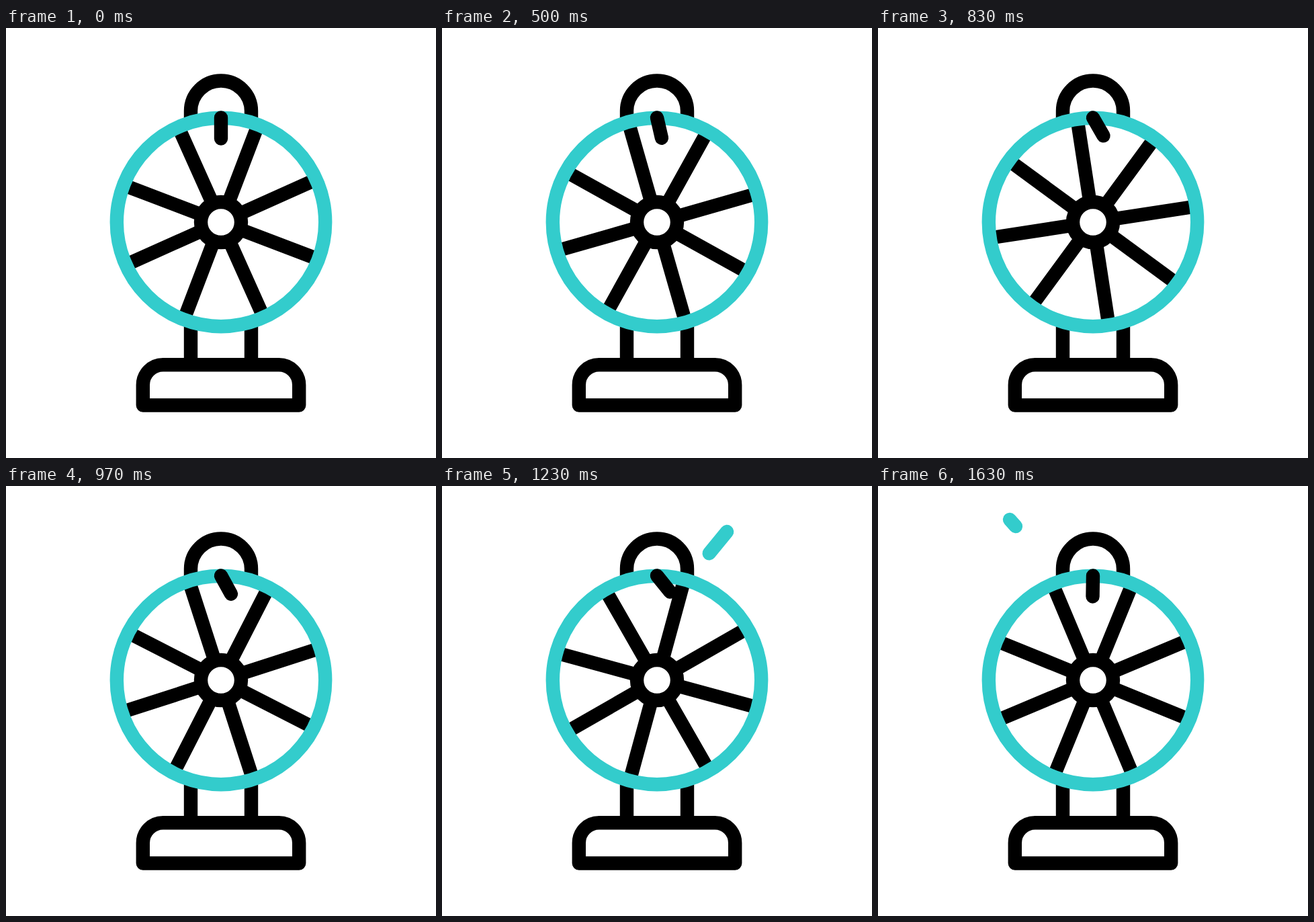
Write an HTML page that moves like this. It is 640 px wide and 640 px high and loops after 1.67 s.

```html
<!DOCTYPE html>
<html lang="en">
<head>
<meta charset="utf-8">
<title>Spinning wheel</title>
<style>
  html, body { margin: 0; width: 100%; height: 100%; overflow: hidden; background: #fff; }
  svg { display: block; width: 100%; height: 100%; }
  .ink, .accent { fill: none; stroke: #000; stroke-width: 20.4; }
  .accent { stroke: #3cc; }
  .round { stroke-linecap: round; stroke-linejoin: round; }
  .white { fill: #fff; }
</style>
</head>
<body>
<svg viewBox="0 0 640 640">
  <path class="ink" d="M275 500V123.5a45 45 0 0 1 90 0V500"/>
  <path class="ink white round" d="M203.8 561.5V531.3a30 30 0 0 1 30-30H406.2a30 30 0 0 1 30 30V561.5Z"/>
  <circle class="white" cx="320" cy="289" r="155"/>
  <g id="spokes" class="ink">
    <path d="M320 139V439M170 289H470"/>
    <path d="M320 139V439M170 289H470" transform="rotate(45 320 289)"/>
  </g>
  <circle class="ink white" cx="320" cy="289" r="30"/>
  <circle class="accent" cx="320" cy="289" r="155.2"/>
  <path id="pointer" class="ink round" d="M320 133.5V164.5"/>
  <g id="sparks" class="accent round"></g>
</svg>
<script>
const LOOP = 1670;
const spokes = document.getElementById('spokes');
const pointer = document.getElementById('pointer');

const clamp = x => Math.min(1, Math.max(0, x));
const smooth = x => (x = clamp(x), x * x * (3 - 2 * x));
const mix = (a, b, k) => a + (b - a) * k;

// Keys are [step, angle, speed]; cubic curves join them, and speed defaults to rest.
function follow(keys, step) {
  const i = keys.findIndex(key => key[0] > step);
  if (i < 0) return keys.at(-1)[1];
  const [t0, a0, v0 = 0] = keys[i - 1], [t1, a1, v1 = 0] = keys[i];
  const span = t1 - t0, u = (step - t0) / span;
  return mix(a0, a1, smooth(u)) + span * u * (1 - u) * (v0 * (1 - u) - v1 * u);
}

// The wheel winds back, spins forward and settles where it began.
const wheel = [[-1, 22.5], [14, -106.5], [32, 10.8, 9.6], [46, 112.2]];
const swing = [[0, 0], [8, 12], [20, -28], [25, -30], [32, -28], [37, -39], [45, 5], [49, 0.9]];

const sparks = [
  { start: 33, from: [395, 103.5], to: [443, 45] },
  { start: 37, from: [320, 46], to: [320, 12] },
  { start: 41, from: [241, 101], to: [196, 50] }
].map(spark => {
  const line = document.createElementNS('http://www.w3.org/2000/svg', 'path');
  document.getElementById('sparks').append(line);
  return { ...spark, line };
});

function drawSpark({ start, from, to, line }, step) {
  const head = smooth((step - start) / 7);
  const tail = smooth((step - start - 3) / 7);
  const at = k => from.map((v, i) => mix(v, to[i], k));
  line.setAttribute('d', head > tail ? `M${at(tail)}L${at(head)}` : '');
}

function draw(now) {
  const step = Math.min(49, Math.floor((now % LOOP + 3.4) * 0.03));
  spokes.setAttribute('transform', `rotate(${follow(wheel, step)} 320 289)`);
  pointer.setAttribute('transform', `rotate(${follow(swing, step)} 320 133.5)`);
  sparks.forEach(spark => drawSpark(spark, step));
}

let origin;
function tick(now) {
  origin ??= now;
  draw(now - origin);
  requestAnimationFrame(tick);
}
draw(0);
requestAnimationFrame(tick);
</script>
</body>
</html>
```
